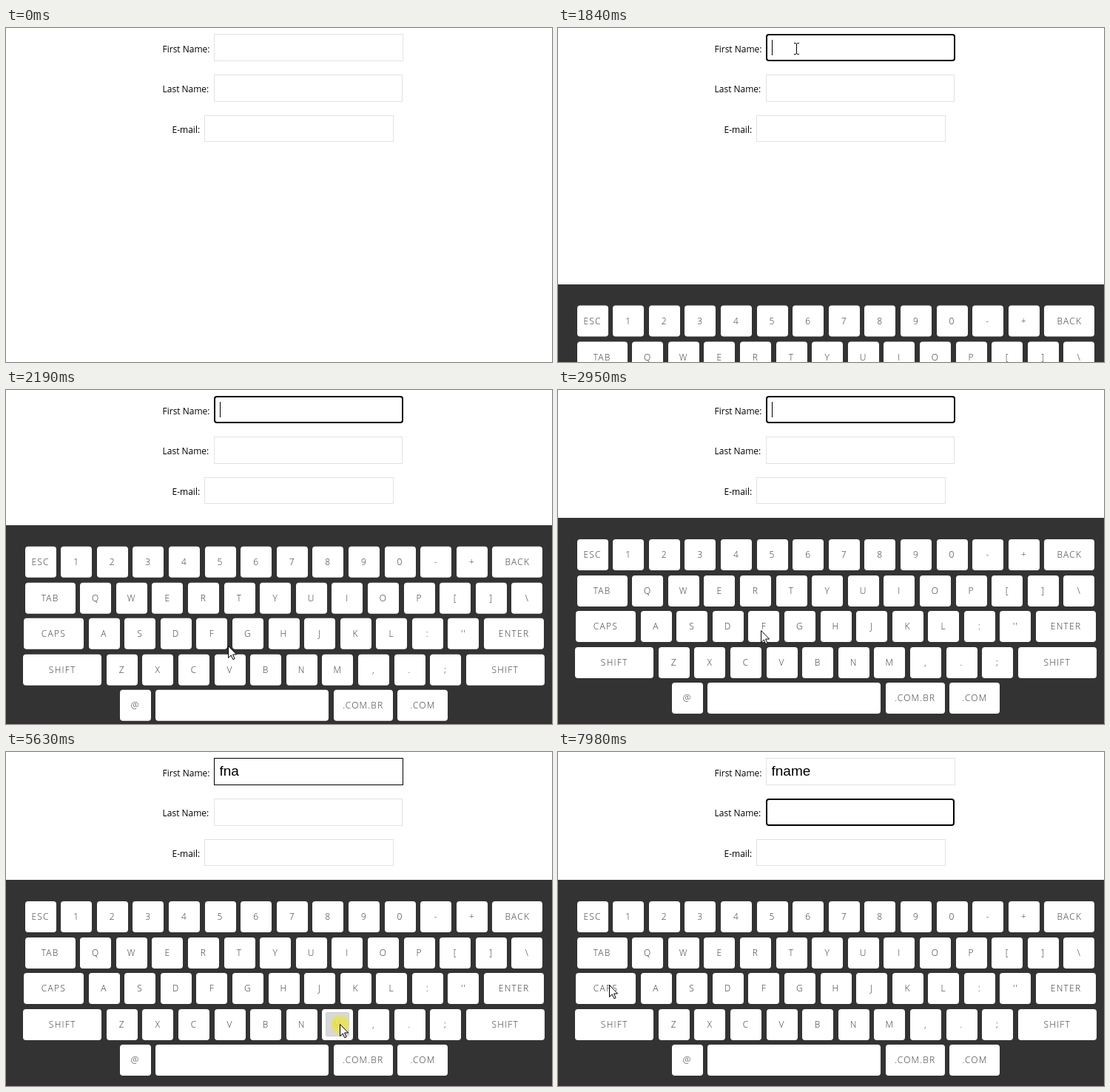
Recreate the animation shown at these times as an HTML page. Size 738 px wide and 452 px high, loop 8000 ms.

```html
<!DOCTYPE html>
<html lang="en">
<head>
<meta charset="utf-8">
<title>On-screen keyboard</title>
<style>
html, body { margin: 0; width: 100%; height: 100%; overflow: hidden; background: #fff; }
#stage { position: relative; width: 738px; height: 452px; overflow: hidden; font: 12px/16px "Open Sans", "Noto Sans", sans-serif; color: #000; }
#stage > * { position: absolute; }
.anim { animation: 8s step-end infinite; }

.field { box-sizing: border-box; border: 1px solid #e2e2e2; background: #fff; }
#first { left: 281px; top: 8px; width: 256px; height: 37px; animation-name: first; }
#last { left: 281px; top: 63px; width: 255px; height: 37px; animation-name: last; }
#mail { left: 268px; top: 118px; width: 256px; height: 36px; }
.caret { left: 289px; width: 1px; height: 21px; background: #000; opacity: 0; }
#caret1 { top: 16px; animation-name: caret1; }
#caret2 { top: 71px; animation-name: caret2; }
#typed { left: 288.5px; top: 15px; width: 0; overflow: hidden; white-space: nowrap; font: 19px/22px "Liberation Sans", Arial, sans-serif; animation-name: type; }

#board { left: 0; top: 173px; width: 751px; height: 279px; padding-top: 29px; box-sizing: border-box; background: #333; transform: translateY(279px); animation: slide 8s infinite; }
.row { display: flex; justify-content: center; gap: 6.6px; height: 42px; margin-bottom: 6.6px; }
.key { position: relative; flex: none; width: 42px; border-radius: 4px; background: #fff; color: #3a3a3a; font-weight: 300; text-align: center; line-height: 42px; letter-spacing: 1.25px; }
.key i { position: absolute; inset: 4px 5px 5px; border-radius: 2px; background: rgba(190, 190, 190, .85); box-shadow: inset 0 0 0 1px #aaa6; opacity: 0; animation: 8s linear infinite; }
#edge { left: 0; top: 449px; width: 738px; height: 3px; background: #392f32; opacity: 0; animation-name: edge; }

#pointer { left: 0; top: 0; overflow: visible; animation: move 8s ease-in-out infinite; }
#pointer > * { opacity: 0; }
#spot { fill: #ebe545; fill-opacity: .8; animation-name: spot; }
#arrow { fill: #fff; stroke: #000; animation-name: arrow; }
#beam { fill: none; stroke: #000; animation-name: beam; }

@keyframes first {
  20.125% { border: 2px solid #000; border-radius: 4px; }
  42.75% { border: 1px solid #000; border-radius: 0; }
  86.625% { border: 1px solid #e2e2e2; border-radius: 0; }
}
@keyframes last { 86.625%, 100% { border: 2px solid #000; border-radius: 4px; } }
@keyframes caret1 { 20.125%, 34.44% { opacity: 1; } 27.8%, 41.06% { opacity: 0; } }
@keyframes caret2 { 86.625% { opacity: 1; } 93.2% { opacity: 0; } }
@keyframes type {
  43.6% { width: 6px; }
  50% { width: 16px; }
  60% { width: 26.6px; }
  72% { width: 42.6px; }
  78.8%, 100% { width: 60px; }
}
@keyframes slide {
  0%, 20.125% { transform: translateY(279px); animation-timing-function: cubic-bezier(.36, .25, .63, 1); }
  28.56%, 100% { transform: none; }
}
@keyframes edge { 25.6%, 100% { opacity: 1; } }
@keyframes move {
  0%, 15.125% { transform: translate(352px, 440px); }
  18.6%, 23.9% { transform: translate(322px, 28px); }
  25.625% { transform: translate(291px, 327px); }
  27.375% { transform: translate(300px, 346px); }
  35.25%, 36.8% { transform: translate(275px, 326px); }
  36.9%, 44.5% { transform: translate(274px, 325px); }
  48%, 52.375% { transform: translate(394px, 368px); }
  57.5%, 62% { transform: translate(126px, 322px); }
  63.5%, 66% { transform: translate(391px, 367px); }
  68.75%, 72.125% { transform: translate(451px, 368px); }
  75.5%, 80.25% { transform: translate(209px, 271px); }
  84.125%, 90.25% { transform: translate(350px, 83px); }
  99.75%, 100% { transform: translate(69px, 315px); }
}
@keyframes arrow { 15.125%, 24.5%, 90.8%, 100% { opacity: 1; } 18%, 83.4% { opacity: 0; } }
@keyframes beam { 18%, 83.4% { opacity: 1; } 24.5%, 90.8% { opacity: 0; } }
@keyframes spot {
  20.125%, 41.875%, 48.9%, 58.5%, 69.9%, 77.125%, 86.625% { opacity: 1; }
  22%, 43.3%, 50.2%, 60%, 71.5%, 78.6%, 90.25% { opacity: 0; }
}
@keyframes press-F { 0%, 41.8% { opacity: 0; } 42.5%, 45% { opacity: 1; } 45.1%, 100% { opacity: 0; } }
@keyframes press-N { 0%, 48.8% { opacity: 0; } 49.5%, 52.3% { opacity: 1; } 52.4%, 100% { opacity: 0; } }
@keyframes press-A { 0%, 58.4% { opacity: 0; } 59.1%, 62.6% { opacity: 1; } 62.7%, 100% { opacity: 0; } }
@keyframes press-M { 0%, 69.9% { opacity: 0; } 70.6%, 73% { opacity: 1; } 73.1%, 100% { opacity: 0; } }
@keyframes press-E { 0%, 77.1% { opacity: 0; } 77.8%, 80% { opacity: 1; } 80.1%, 100% { opacity: 0; } }
</style>
</head>
<body>
<div id="stage">
  <span style="left:211.5px;top:21px">First Name:</span>
  <span style="left:211.5px;top:75px">Last Name:</span>
  <span style="left:224.5px;top:130px">E-mail:</span>
  <div id="first" class="field anim"></div>
  <div id="last" class="field anim"></div>
  <div id="mail" class="field"></div>
  <div id="typed" class="anim">fname</div>
  <div id="caret1" class="caret anim"></div>
  <div id="caret2" class="caret anim"></div>
  <div id="board"></div>
  <div id="edge" class="anim"></div>
  <svg id="pointer" width="1" height="1">
    <circle id="spot" class="anim" r="12"/>
    <path id="arrow" class="anim" d="M.5.5V16.5L4.2 13l2.6 5.7 2.3-1L6.6 12H11.6Z"/>
    <path id="beam" class="anim" d="M-3-7.5h2l1.5 1 1.5-1h2M.5-6.5v13M-3 7.5h2l1.5-1 1.5 1h2"/>
  </svg>
</div>
<script>
const rows = [
  "ESC 1 2 3 4 5 6 7 8 9 0 - + BACK",
  "TAB Q W E R T Y U I O P [ ] \\",
  "CAPS A S D F G H J K L : '' ENTER",
  "SHIFT Z X C V B N M , . ; SHIFT",
  "@ SPACE .COM.BR .COM"
];
const widths = { BACK: 68, TAB: 68, CAPS: 81, ENTER: 81, SHIFT: 106, SPACE: 234, ".COM.BR": 80, ".COM": 68 };
const board = document.getElementById("board");

function add(parent, tag, cls) {
  const el = parent.appendChild(document.createElement(tag));
  el.className = cls;
  return el;
}

for (const names of rows) {
  const row = add(board, "div", "row");
  for (const name of names.split(" ")) {
    const key = add(row, "div", "key");
    key.textContent = name === "SPACE" ? "" : name;
    if (widths[name]) key.style.width = widths[name] + "px";
    if (/^[FNAME]$/.test(name)) add(key, "i", "").style.animationName = "press-" + name;
  }
}
</script>
</body>
</html>
```
